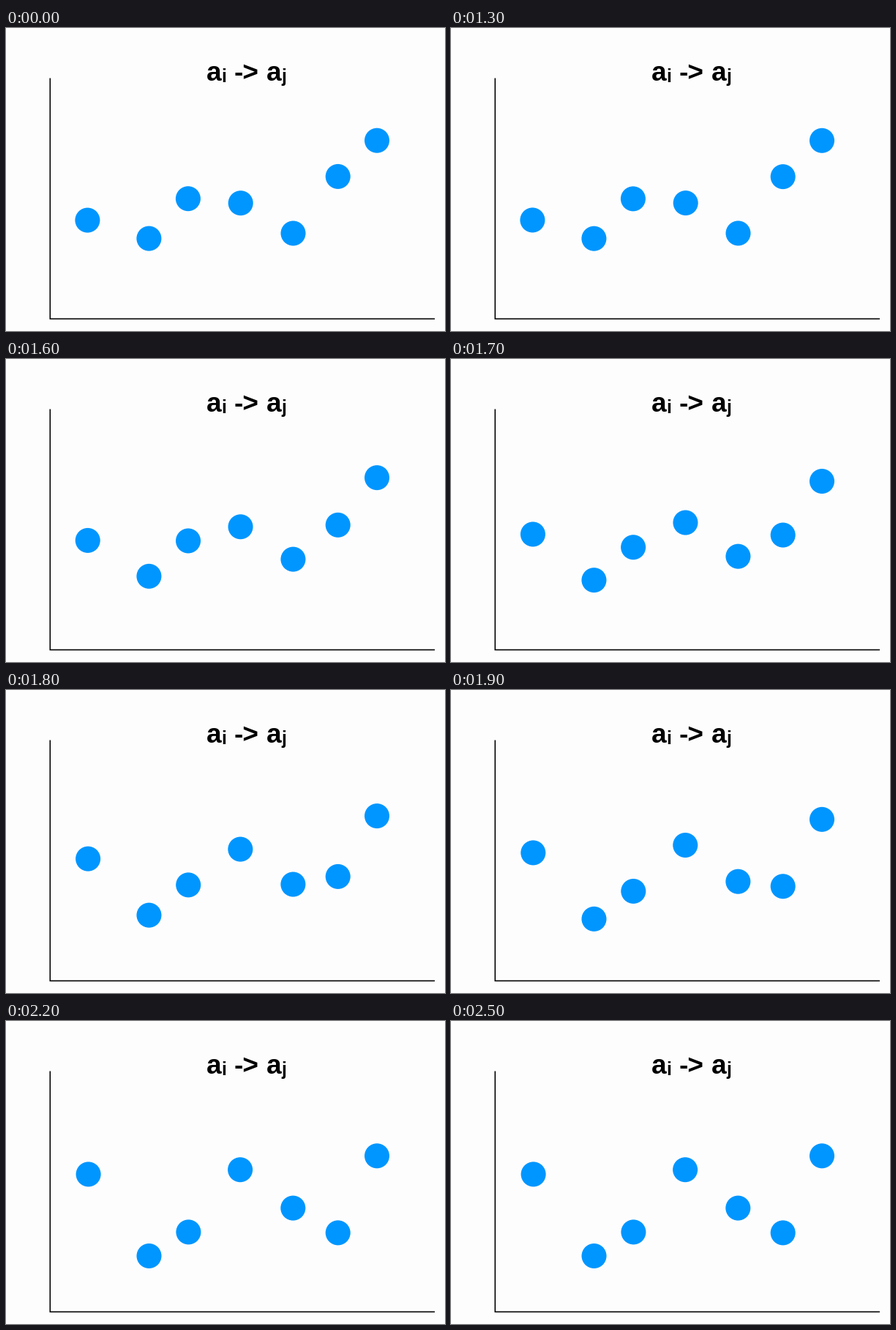
These frames come from a looping animation (600 px wide and 414 px high, 2.6 s). A matplotlib script:

```python
import math

import matplotlib.pyplot as plt
from matplotlib.animation import FuncAnimation
from matplotlib.patches import Circle

W, H, DPI = 600, 414, 96
STEP, FRAMES = 100, 26
MOVE_START, MOVE_TIME = 1268, 942
RADIUS = 17
BLUE, PAPER = "#0096ff", "#fdfdfe"

# (x, y) at rest and after the move
DOTS = [
    ((111.4, 262.6), (112.6, 209.4)),
    ((195.4, 287.6), (195.5, 321.0)),
    ((248.9, 233.2), (249.4, 288.4)),
    ((320.7, 239.2), (320.1, 203.2)),
    ((392.5, 280.5), (392.3, 255.6)),
    ((453.7, 202.9), (453.7, 289.4)),
    ((507.0, 153.7), (507.0, 184.3)),
]

fig = plt.figure(figsize=(W / DPI, H / DPI), dpi=DPI, facecolor=PAPER)
ax = fig.add_axes([0, 0, 1, 1])
ax.set_xlim(0, W)
ax.set_ylim(H, 0)
ax.axis("off")


def px(size):
    """Convert pixels to points."""
    return size * 72 / DPI


def label(x, y, text, size):
    ax.text(x, y, text, fontsize=px(size), family="Liberation Sans",
            weight="bold", color="black", ha="left", va="baseline")


ax.plot([60.3, 60.3, 586], [68.5, 397.4, 397.4], color="black", lw=px(1.6),
        solid_joinstyle="miter", solid_capstyle="butt", snap=False)
ax.plot([232, 368], [413.5, 413.5], color="#f3f3f3", lw=px(1),
        solid_capstyle="butt")

label(274, 72, "a", 37)
label(294.6, 74, "i", 24.5)
label(311.5, 72, "->", 37)
label(356, 72, "a", 37)
label(376.5, 74, "j", 24.5)

circles = [ax.add_patch(Circle(start, RADIUS, color=BLUE, lw=0))
           for start, _ in DOTS]


def ease(t):
    u = min(max((t - MOVE_START) / MOVE_TIME, 0), 1)
    return (1 - math.cos(math.pi * u)) / 2


def draw(frame):
    p = ease(frame * STEP)
    for circle, ((x0, y0), (x1, y1)) in zip(circles, DOTS):
        circle.center = (x0 + (x1 - x0) * p, y0 + (y1 - y0) * p)
    return circles


anim = FuncAnimation(fig, draw, frames=FRAMES, interval=STEP, repeat=True,
                     repeat_delay=0)
plt.show()
```
